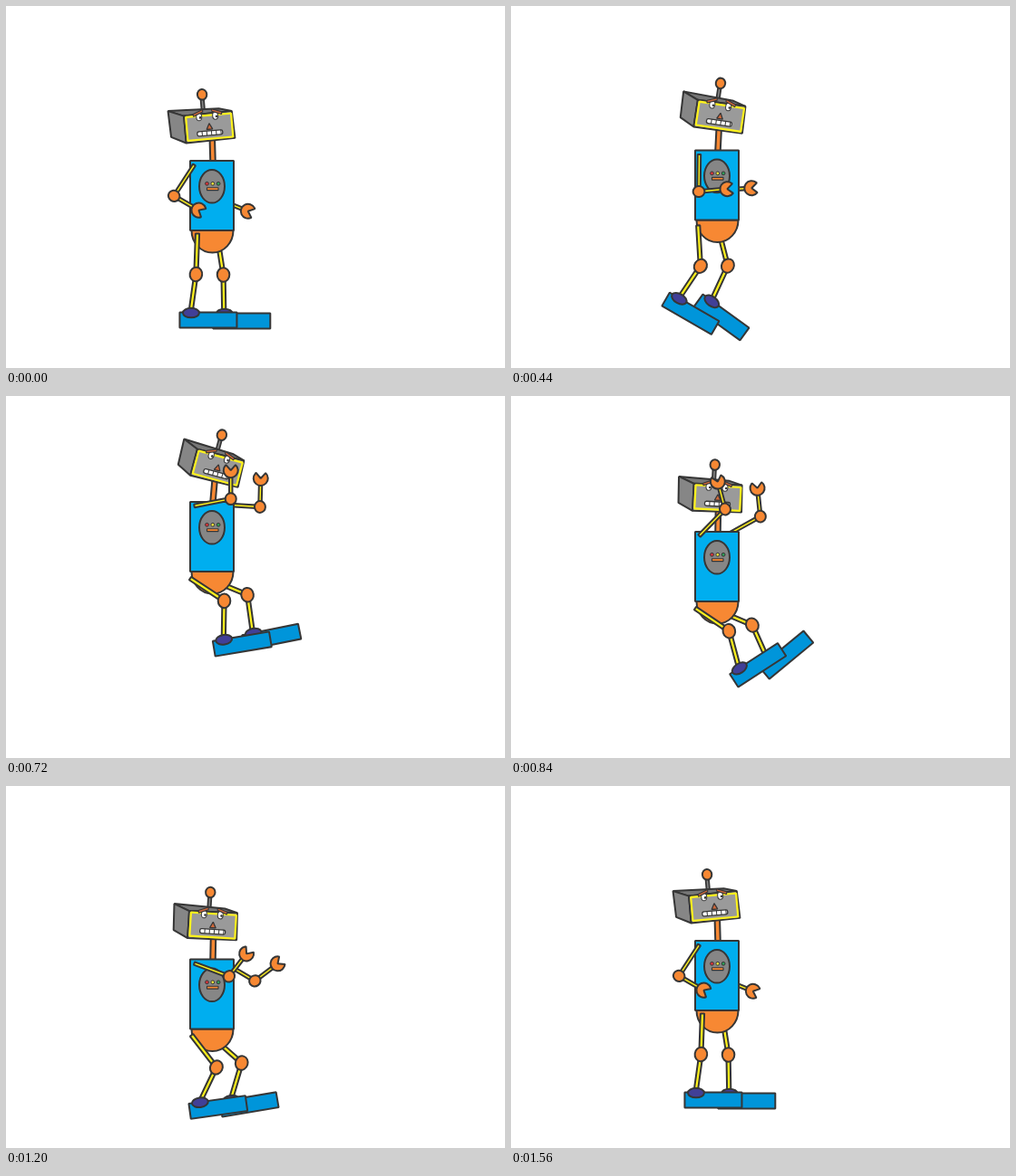
An HTML page with a canvas for the animation above (1.6 s loop, 550x400 px).

```html
<!DOCTYPE html>
<html lang="en">
<head>
<meta charset="utf-8">
<title>Jumping robot</title>
<style>
html, body { margin: 0; width: 100%; height: 100%; overflow: hidden; background: #fff; }
canvas { display: block; }
</style>
</head>
<body>
<canvas id="stage" width="550" height="400"></canvas>
<script>
const ctx = document.getElementById('stage').getContext('2d');
const STEP = 40, COUNT = 40;
const INK = '#363636', ORANGE = '#f78833', YELLOW = '#fff21c', SKY = '#00aeef',
      BOARD = '#0095da', PURPLE = '#413f97', GREY = '#868686', FACE = '#9a9a9a',
      RUST = '#d0683a';
const BODY_X = 203, UPPER_ARM = 41, FOREARM = 31.5, THIGH = 45, SHIN = 43;

// Key poses of the jump. Limbs are bone angles in degrees: [upper, lower].
// A pose may leave out a part, which then swings on to its next key.
const stand = { at: 0, y: 171, tilt: -5, near: [123, 30], far: [92, 22], leg: [92, 98], foot: 0, hip: 5 };
const poses = [
  stand,
  { at: 6, y: 204, tilt: -0.5, near: [174, 82], far: [174, 93], leg: [39, 131], foot: 4, hip: 4 },
  { at: 10, leg: [100, 128], foot: 34, hip: 1 },
  { at: 15, y: 124, tilt: 16, near: [24, -75], far: [36, -81], leg: [33, 107], foot: 14, hip: -3 },
  { at: 17, y: 106, tilt: 19 },
  { at: 21, y: 150, tilt: 3, near: [-46, -105], far: [-29, -96], leg: [34, 75], foot: -33, hip: -3 },
  { at: 26, y: 192, tilt: 2.5, near: [-29, -90], far: [-6, -67], leg: [49, 110], foot: -16, hip: -2 },
  { at: 34, y: 191, tilt: 4.5, near: [70, -15], far: [67, -7], leg: [56, 121], foot: 0, hip: -1 },
  { ...stand, at: COUNT - 1 }
];

const mix = (a, b, k) => a + (b - a) * k;
const rad = deg => deg * Math.PI / 180;

function value(part, frame) {
  const keys = poses.filter(p => part in p);
  const next = Math.max(1, keys.findIndex(p => p.at >= frame));
  const a = keys[next - 1], b = keys[next];
  const k = (frame - a.at) / (b.at - a.at);
  return Array.isArray(a[part]) ? a[part].map((v, i) => mix(v, b[part][i], k)) : mix(a[part], b[part], k);
}

function paint(fill, width = 2) {
  ctx.fillStyle = fill;
  ctx.fill();
  ctx.strokeStyle = INK;
  ctx.lineWidth = width;
  ctx.stroke();
}

function oval(x, y, rx, ry, fill, width = 2) {
  ctx.beginPath();
  ctx.ellipse(x, y, rx, ry, 0, 0, 7);
  paint(fill, width);
}

function box(x, y, w, h, fill, width = 2, radius = 0) {
  ctx.beginPath();
  ctx.roundRect(x, y, w, h, radius);
  paint(fill, width);
}

function shape(fill, width, ...points) {
  ctx.beginPath();
  points.forEach(([x, y]) => ctx.lineTo(x, y));
  ctx.closePath();
  paint(fill, width);
}

function at(x, y, degrees, draw) {
  ctx.save();
  ctx.translate(x, y);
  ctx.rotate(rad(degrees));
  draw();
  ctx.restore();
}

const reach = (from, degrees, length) => ({
  x: from.x + length * Math.cos(rad(degrees)),
  y: from.y + length * Math.sin(rad(degrees))
});

function drawLimb(root, [upper, lower], upperLength, lowerLength, width, jointLength, jointWidth) {
  const joint = reach(root, upper, upperLength);
  at(root.x, root.y, upper, () => box(0, -width / 2, upperLength, width, YELLOW));
  at(joint.x, joint.y, lower, () => {
    box(0, -width / 2, lowerLength, width, YELLOW);
    oval(0, 0, jointLength, jointWidth, ORANGE);
  });
  return reach(joint, lower, lowerLength);
}

function drawLeg(hip, angles, tilt) {
  const ankle = drawLimb(hip, angles, THIGH, SHIN, 4.2, 7.8, 6.8);
  at(ankle.x, ankle.y, tilt, () => {
    box(-12, -0.5, 63, 17, BOARD);
    oval(0.5, 0, 9, 5.3, PURPLE);
  });
}

function drawArm(shoulder, angles) {
  const hand = drawLimb(shoulder, angles, UPPER_ARM, FOREARM, 3.4, 6.4, 6);
  at(hand.x, hand.y, angles[1], () => {
    ctx.beginPath();
    ctx.moveTo(0, 0);
    ctx.arc(0, 0, 8, 0.72, -0.72);
    ctx.closePath();
    paint(ORANGE);
  });
}

function drawTorso(x, y) {
  ctx.beginPath();
  ctx.ellipse(x + 24.5, y + 77, 23, 24.5, 0, 0, Math.PI);
  ctx.closePath();
  paint(ORANGE);
  box(x, y, 48, 77, SKY);
  oval(x + 24, y + 28.3, 14, 18.3, GREY);
  ['#d9343a', '#f5e63a', '#2f9e58'].forEach((c, i) => oval(x + 18.5 + i * 6.3, y + 25.3, 1.9, 1.9, c, 1));
  box(x + 18.5, y + 29.8, 12.5, 2.8, ORANGE, 1.1);
}

function drawHead() {
  const backLeft = [-44, -21.5], topLeft = [-27, -14.5], topRight = [26, -15.5], bottomLeft = [-27, 15.5];
  box(-7, -31, 3.4, 14, GREY, 1.8);
  oval(-5, -36.5, 5.2, 5.8, ORANGE);
  shape('#777', 2, backLeft, [12, -19.5], topRight, topLeft);
  shape(GREY, 2, backLeft, topLeft, bottomLeft, [-43, 7.5]);
  shape(FACE, 2, topLeft, topRight, [27, 14.5], bottomLeft);
  ctx.strokeStyle = YELLOW;
  ctx.lineWidth = 2.2;
  ctx.strokeRect(-25, -13, 50, 26);

  for (const side of [-1, 1]) {
    const eye = side * 9 - 1.5;
    oval(eye, -12, 3, 4.2, '#fff', 1);
    oval(eye + 1.3, -11.2, 0.8, 0.8, INK, 1);
    shape(RUST, 1.1, [side * 5 - 1, -19.8], [side * 16 - 1, -15.6], [side * 15.5 - 1, -13], [side * 5 - 1, -17.2]);
  }
  shape(RUST, 1.3, [0, -4], [3.3, 2.5], [-3.3, 2.5]);
  box(-14, 4.2, 28, 5, '#fff', 1.3, 2);
  ctx.beginPath();
  for (let x = -8.6; x < 13; x += 5.2) {
    ctx.moveTo(x, 4.2);
    ctx.lineTo(x, 9.2);
  }
  ctx.lineWidth = 1;
  ctx.stroke();
}

function render(frame) {
  const [y, tilt, near, far, leg, foot, hip] =
    ['y', 'tilt', 'near', 'far', 'leg', 'foot', 'hip'].map(part => value(part, frame));
  const hipY = y + 83 - hip / 2;
  const headX = BODY_X + 23.5 + 0.45 * tilt;
  ctx.fillStyle = '#fff';
  ctx.fillRect(0, 0, 550, 400);
  ctx.lineJoin = 'bevel';

  // The far leg follows the near one, turned a little forward.
  drawArm({ x: BODY_X + 36, y: y + 3 }, far);
  drawLeg({ x: BODY_X + 24.5 + hip, y: hipY + 1 }, [leg[0] - 11, leg[1] - 9], foot * 1.2);
  at(BODY_X + 25, y, tilt / 3, () => box(-2.75, -30, 5.5, 32, ORANGE));
  drawTorso(BODY_X, y);
  drawLeg({ x: BODY_X + 3 + hip, y: hipY }, leg, foot);
  at(headX, y - 37.3, tilt, drawHead);
  drawArm({ x: BODY_X + 4.5, y: y + 4.5 }, near);
}

const start = performance.now();
function tick() {
  render(Math.floor((performance.now() - start) / STEP) % COUNT);
  requestAnimationFrame(tick);
}
tick();
</script>
</body>
</html>
```
